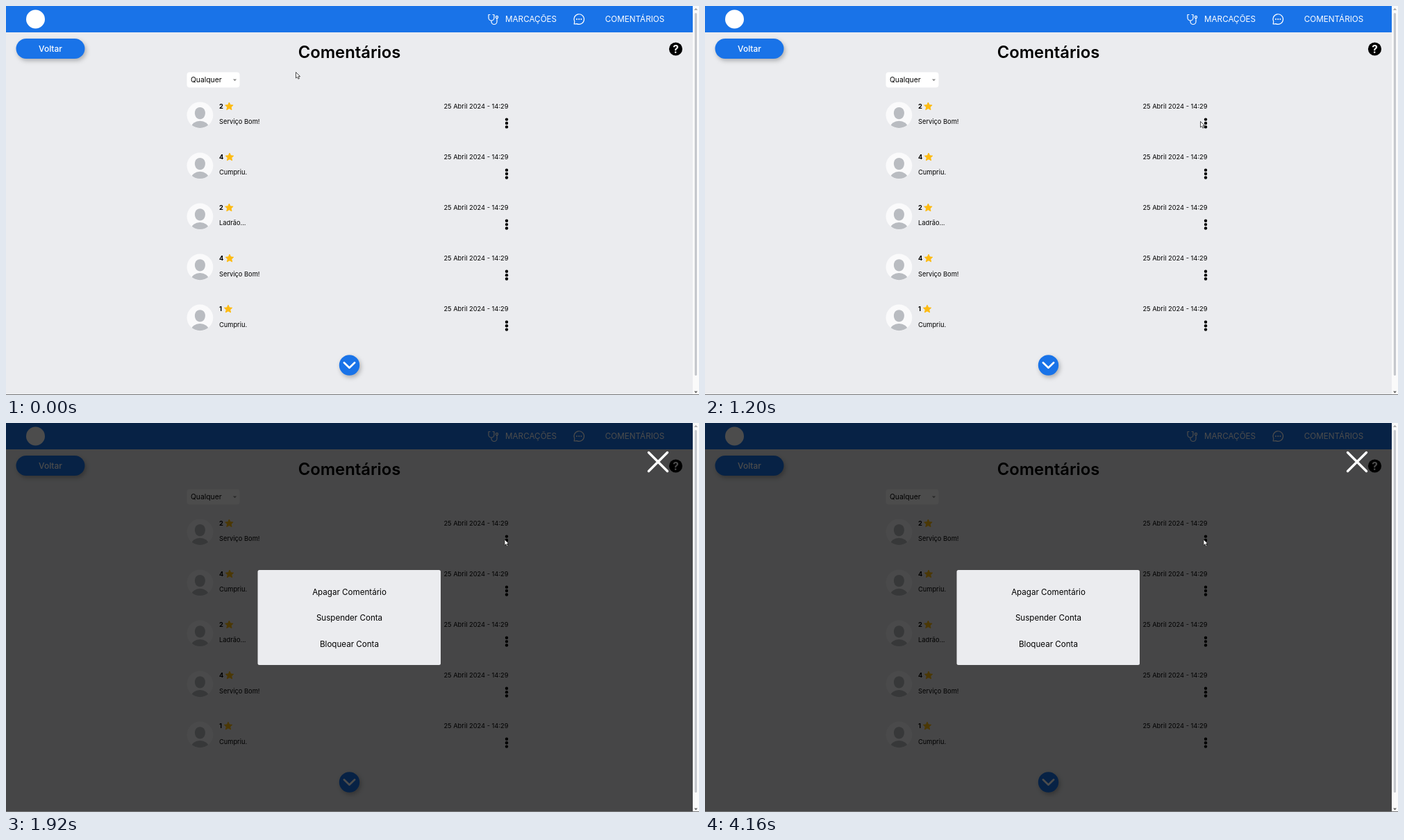
These frames come from a looping animation (998 px wide and 561 px high, 4.24 s). An HTML page:

```html
<!DOCTYPE html>
<html lang="pt">
<head>
<meta charset="utf-8">
<style>
html, body { margin: 0; width: 100%; height: 100%; overflow: hidden; }
svg { display: block; width: 998px; height: 561px; font: 400 9.3px Inter, sans-serif; }
.blue { fill: #1973e8; }
.button { fill: #1973e8; filter: drop-shadow(2px 3px 3px #0004); }
.light { fill: #fff; }
.line { fill: none; stroke: #fff; stroke-linecap: round; stroke-linejoin: round; }
.person { fill: #b9bcc1; }
.star { fill: #fdbb12; stroke: #fdbb12; stroke-linejoin: round; }
.mid { text-anchor: middle; }
.end { text-anchor: end; }
.nav { font-size: 11.7px; }
.pointer { fill: #fff; stroke: #222; stroke-width: .8; stroke-linejoin: round; }
#modal { font-size: 11.6px; }
</style>
</head>
<body>
<svg viewBox="0 0 998 561">
  <defs>
    <clipPath id="round"><circle r="18.7"/></clipPath>
    <g id="avatar">
      <circle fill="#fafafb" r="18.9"/>
      <g class="person" clip-path="url(#round)">
        <path d="M-7.5 -3C-7.5 -14 7.5 -14 7.5 -3C7.5 2 4.5 6 0 6S-7.5 2 -7.5 -3Z"/>
        <ellipse cy="18" rx="12.5" ry="9.5"/>
      </g>
    </g>
    <path id="star" class="star" d="M0 -5.6L1.7 -1.9L5.7 -1.5L2.7 1.2L3.6 5.1L0 3.1L-3.6 5.1L-2.7 1.2L-5.7 -1.5L-1.7 -1.9Z"/>
    <g id="dots"><circle cy="-5.4" r="2.2"/><circle r="2.2"/><circle cy="5.4" r="2.2"/></g>
  </defs>

  <rect width="989" height="561" fill="#ebecef"/>
  <rect class="blue" width="989" height="38"/>
  <circle class="light" cx="42.5" cy="19" r="13.5"/>
  <g class="line" stroke-width="1.2">
    <path d="M697 12.5H695V17a4 4 0 0 0 8 0V12.5H701M699 21v1.5a4 4 0 0 0 8 0V18"/>
    <circle cx="707" cy="16" r="1.6"/>
    <path d="M818.2 26l.6-3.5A7.3 7.3 0 1 1 822 25.6Z"/>
  </g>
  <g class="light nav">
    <circle cx="822" cy="19" r="1"/><circle cx="825.2" cy="19" r="1"/><circle cx="828.4" cy="19" r="1"/>
    <text x="719" y="23.3">MARCAÇÕES</text>
    <text x="862.7" y="23.3">COMENTÁRIOS</text>
  </g>

  <rect class="button" x="14.5" y="47" width="99" height="29" rx="14.5"/>
  <text class="light mid" x="64" y="66" font-size="12" font-weight="500">Voltar</text>
  <text class="mid" x="494.5" y="75.4" font-size="23.8" font-weight="600">Comentários</text>
  <circle cx="964.5" cy="62" r="9.6"/>
  <text class="light mid" x="964.5" y="67.5" font-size="15.5" font-weight="700">?</text>

  <rect class="light" x="260.5" y="95.5" width="76" height="22" rx="4"/>
  <text x="266" y="110.2" font-size="10.3">Qualquer</text>
  <path d="M326.8 105.5h5.4l-2.7 2.8Z" fill="#888"/>

  <g id="rows"></g>

  <circle class="button" cx="494.5" cy="518" r="14.7"/>
  <path class="line" stroke-width="2.6" d="M486.8 514.3L494.5 521.8L502.2 514.3"/>

  <g id="modal">
    <rect width="989" height="561" opacity=".7"/>
    <rect x="362.5" y="212" width="263.5" height="137" rx="2.5" fill="#ebecef"/>
    <g class="mid">
      <text x="494.5" y="248">Apagar Comentário</text>
      <text x="494.5" y="285.4">Suspender Conta</text>
      <text x="494.5" y="322.8">Bloquear Conta</text>
    </g>
    <path class="line" d="M925.5 42.5L952.5 69.5M952.5 42.5L925.5 69.5" stroke-width="3.4"/>
  </g>

  <rect x="989" width="9" height="561" fill="#fafafa"/>
  <rect x="991.8" y="10" width="3.2" height="523" rx="1.6" fill="#c5c7cc"/>
  <path d="M991 6h5l-2.5 -3.2Z" fill="#aaa"/>
  <path d="M991 555.5h5l-2.5 3Z" fill="#666"/>
  <rect y="560" width="998" height="1" fill="#77787a"/>

  <g id="cursor">
    <path id="arrow" class="pointer" d="M.5 .5V9L2.5 7.2L3.9 10.2L5.4 9.5L4 6.6H6.6Z"/>
    <path id="hand" class="pointer" d="M0 1.2C0 -.2 1.8 -.2 1.8 1.2V5.2L5 6Q6 6.3 5.8 7.6L5 12.5H-.2L-2.8 8.2C-3.3 7 -2 6.7 -1.2 7.5L0 8.6Z"/>
  </g>
</svg>
<script>
const $ = id => document.getElementById(id);
const LOOP = 4240, STEP = 80, OPEN = 1920, HOVER = 1360;
const reviews = [[2, 'Serviço Bom!'], [4, 'Cumpriu.'], [2, 'Ladrão...'], [4, 'Serviço Bom!'], [1, 'Cumpriu.']];

$('rows').innerHTML = reviews.map(([stars, comment], i) => `
  <g transform="translate(0 ${i * 73.05})">
    <use href="#avatar" x="279.4" y="157.3"/>
    <text x="307" y="147.6" font-weight="700">${stars}</text>
    <use href="#star" x="${{1: 320, 2: 321.4, 4: 322}[stars]}" y="144.6"/>
    <text x="307" y="170.4">${comment}</text>
    <text class="end" x="723.5" y="147.5">25 Abril 2024 - 14:29</text>
    <use href="#dots" x="721" y="169"/>
  </g>`).join('');

// time, x, y of the pointer tip
const path = [[0, 417, 95], [800, 689.5, 157], [1200, 713, 166], [1440, 717.5, 167.5]];

function pointer(t) {
  const i = path.findIndex(p => p[0] > t);
  if (i < 0) return path.at(-1).slice(1);
  const [t0, x0, y0] = path[i - 1], [t1, x1, y1] = path[i];
  const u = (t - t0) / (t1 - t0), k = u * u * (3 - 2 * u);
  return [x0 + (x1 - x0) * k, y0 + (y1 - y0) * k];
}

const show = (id, on) => $(id).style.display = on ? '' : 'none';

function draw(now) {
  const t = Math.floor(now % LOOP / STEP) * STEP;
  const open = t >= OPEN, hover = t >= HOVER && !open;
  show('modal', open);
  show('hand', hover);
  show('arrow', !hover);
  $('cursor').setAttribute('transform', `translate(${pointer(t)})`);
  requestAnimationFrame(draw);
}
draw(0);
</script>
</body>
</html>
```
